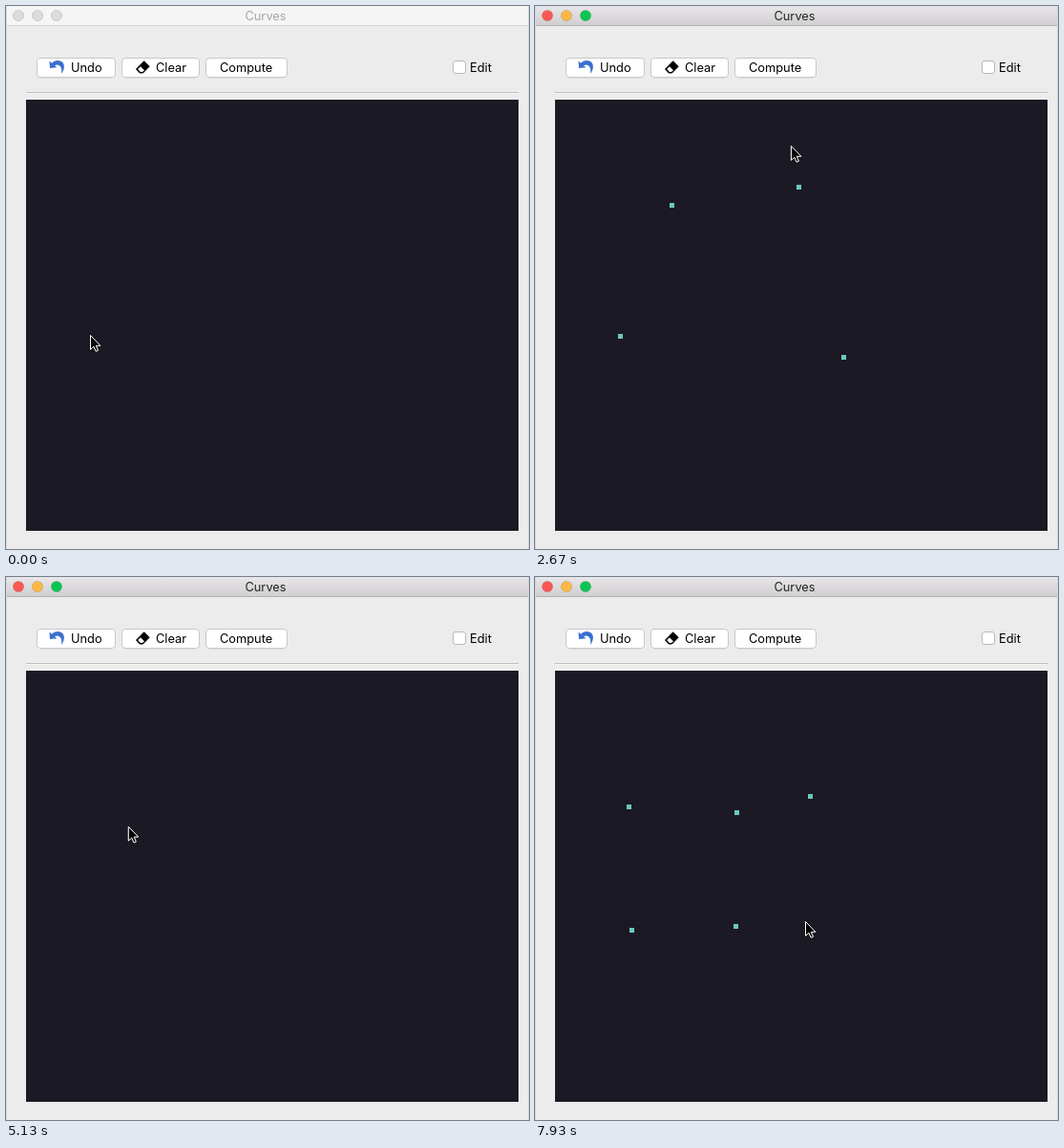
Write an HTML page that moves like this. It is 548 by 568 pixels and loops after 8 s.

```html
<!DOCTYPE html>
<html lang="en">
<head>
<meta charset="utf-8">
<title>Curves</title>
<style>
  html, body { margin: 0; width: 100%; height: 100%; overflow: hidden; background: #ececec; }
  svg { display: block; width: 548px; height: 568px; }
  text { font: 12.8px Inter, Roboto, sans-serif; fill: #000; }
  .button { fill: #fff; stroke: #c8c8c8; }
</style>
</head>
<body>
<svg viewBox="0 0 548 568">
  <defs>
    <linearGradient id="bar" x2="0" y2="1">
      <stop stop-color="#e8e6e8"/><stop offset="1" stop-color="#d1cfd1"/>
    </linearGradient>
    <filter id="shadow" x="-50%" y="-50%" width="200%" height="200%">
      <feDropShadow dx="0" dy="1.2" stdDeviation="1.1" flood-opacity="0.4"/>
    </filter>
  </defs>

  <rect width="548" height="568" fill="#ececec"/>
  <rect id="titleBar" width="548" height="20"/>
  <path id="titleLine" d="M0 20.5H548"/>
  <g id="lights"></g>
  <text id="title" x="272" y="15" text-anchor="middle">Curves</text>
  <path d="M.5 0V568M547.5 0V568" stroke="#d9d9d9"/>

  <rect class="button" x="32.5" y="54.5" width="82" height="20" rx="3.5"/>
  <rect class="button" x="121.5" y="54.5" width="81" height="20" rx="3.5"/>
  <rect class="button" x="209.5" y="54.5" width="85" height="20" rx="3.5"/>
  <path d="M36 75.2H111M125 75.2H199M213 75.2H291" stroke="#cfcfcf" stroke-width=".7"/>
  <path d="M45.5 57.5L46 65L53.5 64.3L51 62.2C55.5 60 59.5 63.5 58 71C62.6 65.5 62 57 54.5 57C51.5 57 49.3 58.2 48 59.8Z" fill="#3a70cf"/>
  <path d="M136.5 66L144.7 57.7L150.2 63.2L143.5 70H140.2Z" stroke="#000" stroke-linejoin="round"/>
  <path d="M138.2 66L141 63.2L145 67.2L142.9 69.1H140.8Z" fill="#fff"/>
  <text x="68" y="69">Undo</text>
  <text x="157" y="69">Clear</text>
  <text x="224" y="69">Compute</text>
  <rect class="button" x="468.5" y="57.5" width="13" height="13" rx="2.5" style="stroke:#b9b9b9"/>
  <text x="486" y="69">Edit</text>

  <path d="M21 90.5H537" stroke="#bebebe"/>
  <path d="M21 91.5H537" stroke="#f6f6f6"/>
  <rect x="21" y="98" width="516" height="451" fill="#1b1924"/>
  <path id="curve" fill="none" stroke="#d24be0" stroke-width="2" shape-rendering="crispEdges"/>
  <g id="markers" fill="#6ac8c0" shape-rendering="crispEdges"></g>
  <path id="cursor" d="M.5 .5V15.4L3.9 12.2L6.2 17.2L8.5 16.2L6.3 11.3H10.9Z" fill="#000" stroke="#fff" filter="url(#shadow)"/>
</svg>
<script>
const $ = id => document.getElementById(id);
const TICK = 1000 / 15, LOOP = 120;

// The pointer leaves for each stop at one tick and clicks there at another
const stop = (leave, click, x, y, action = "point") => ({ leave, click, x, y, action });
const stops = [
  stop(0, 2, 89, 345),
  stop(2, 12, 143, 208),
  stop(13, 20, 276, 189),
  stop(21, 28, 323, 367),
  stop(30, 47, 250, 70, "compute"),
  stop(56, 67, 180, 64, "clear"),
  stop(71, 83, 101, 369),
  stop(84, 90, 98, 240),
  stop(93, 100, 211, 246),
  stop(101, 106, 210, 365),
  stop(107, 114, 288, 229),
  stop(114, 121, 284, 361)
];
const clickOf = action => stops.find(s => s.action === action).click;
const compute = clickOf("compute"), clear = clickOf("clear");
const points = stops.filter(s => s.action === "point");

function add(parent, name, attrs) {
  const node = document.createElementNS("http://www.w3.org/2000/svg", name);
  for (const key in attrs) node.setAttribute(key, attrs[key]);
  return parent.appendChild(node);
}

const lightColors = ["#fc5753", "#fdb845", "#0ac552"];
const lights = lightColors.map((_, i) =>
  add($("lights"), "circle", { cx: 13 + 20 * i, cy: 10, r: 5.6, stroke: "#000", "stroke-opacity": .12 }));

const markers = points.map(({ x, y }) =>
  add($("markers"), "rect", { x: x - 2, y: y - 2, width: 5, height: 5 }));

// One uniform cubic B-spline segment, written as a Bezier curve
function splinePath(controls) {
  const mix = (...weights) => ["x", "y"].map(axis =>
    controls.reduce((sum, p, i) => sum + p[axis] * weights[i], 0) / 6 + 1);
  return `M${mix(1, 4, 1, 0)}C${mix(0, 4, 2, 0)} ${mix(0, 2, 4, 0)} ${mix(0, 1, 4, 1)}`;
}
$("curve").setAttribute("d", splinePath(points.slice(0, 4)));

// Moves ease in and out and settle two ticks before the click
function cursorAt(tick) {
  const next = Math.max(1, stops.findLastIndex(s => s.leave <= tick));
  const from = stops[next - 1], to = stops[next];
  const u = Math.min(1, Math.max(0, (tick - to.leave) / (to.click - 2 - to.leave)));
  const ease = u * u * (3 - 2 * u);
  return ["x", "y"].map(axis => from[axis] + (to[axis] - from[axis]) * ease - 1);
}

const show = (node, visible) => node.setAttribute("visibility", visible ? "visible" : "hidden");

function render(tick) {
  const active = tick > 0;
  $("titleBar").setAttribute("fill", active ? "url(#bar)" : "#f5f5f6");
  $("titleLine").setAttribute("stroke", active ? "#b3b1b3" : "#d8d8d8");
  $("title").style.fill = active ? "#222" : "#a6a6a6";
  lights.forEach((light, i) => light.setAttribute("fill", active ? lightColors[i] : "#dcdcdc"));
  markers.forEach((marker, i) => {
    const { click } = points[i];
    show(marker, tick >= click && (click > clear || tick < clear));
  });
  show($("curve"), tick >= compute && tick < clear);
  $("cursor").setAttribute("transform", `translate(${cursorAt(tick)})`);
}

const start = performance.now();
function frame() {
  render(Math.floor((performance.now() - start + 4) / TICK) % LOOP);
  requestAnimationFrame(frame);
}
frame();
</script>
</body>
</html>
```
